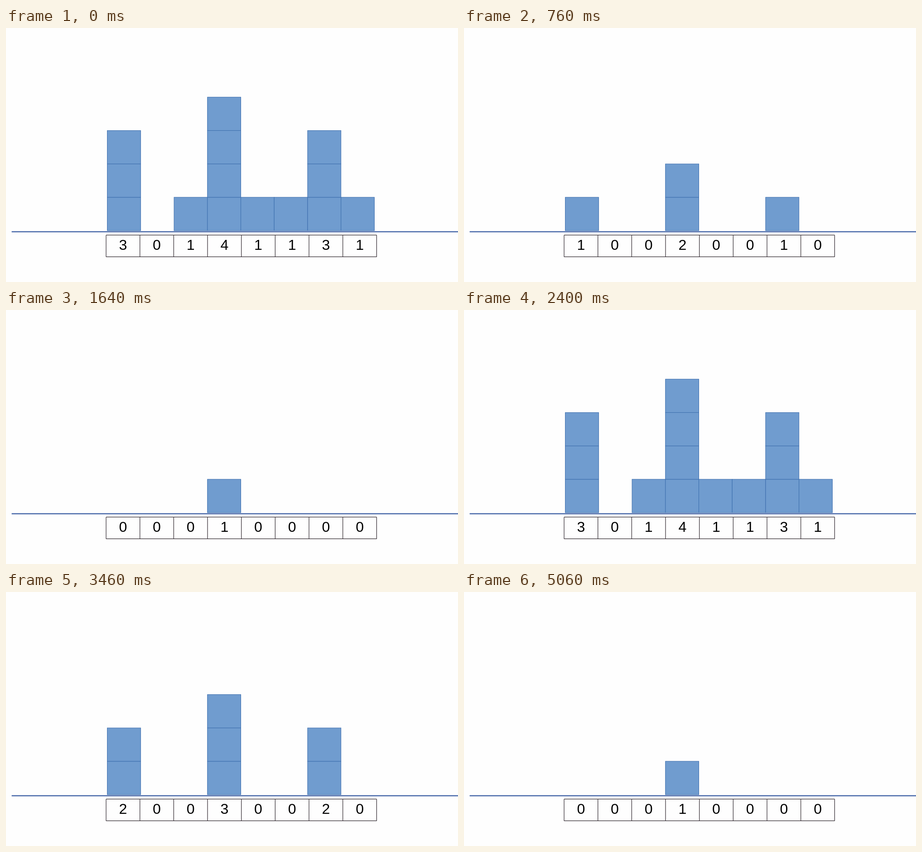
An HTML page that plays this animation: 998x561 px, repeating every 6160 ms.

```html
<!DOCTYPE html>
<html lang="en">
<head>
<meta charset="utf-8">
<title>Block columns</title>
<style>
  html, body { margin: 0; width: 100%; height: 100%; overflow: hidden; background: #fefefe; }
  svg { display: block; width: 998px; height: 561px; }
  text { font: 32px "Liberation Sans", Arial, sans-serif; text-anchor: middle; fill: #000; }
  .block { fill: #709ccf; stroke: #3d6eae; stroke-width: 1; }
  .ground { stroke: #4868a9; stroke-width: 2.6; }
  .grid { fill: none; stroke: #30282f; stroke-width: 1.2; }

  /* Each state cuts in and out hard, twice per loop. */
  .state { visibility: hidden; animation: 6160ms step-end infinite; }
  .s0 { animation-name: full; }
  .s1 { animation-name: minus1; }
  .s2 { animation-name: minus2; }
  .s3 { animation-name: minus3; }
  @keyframes full {
    0%, 38.961% { visibility: visible; }
    .649%, 52.922%, 100% { visibility: hidden; }
  }
  @keyframes minus1 {
    0%, 12.337%, 65.584%, 100% { visibility: hidden; }
    .649%, 52.922% { visibility: visible; }
  }
  @keyframes minus2 {
    0%, 24.35%, 82.142%, 100% { visibility: hidden; }
    12.337%, 65.584% { visibility: visible; }
  }
  @keyframes minus3 {
    0%, 38.961% { visibility: hidden; }
    24.35%, 82.142%, 100% { visibility: visible; }
  }
</style>
</head>
<body>
<svg id="stage" viewBox="0 0 998 561"></svg>
<script>
  const heights = [3, 0, 1, 4, 1, 1, 3, 1];
  const block = { x: 223.6, base: 447.6, size: 73.72 };
  const cell = { x: 221, top: 457.4, bottom: 505.4, width: 74.67 };
  const right = cell.x + cell.width * heights.length;

  const drawBlock = (col, row) =>
    `<rect class="block" x="${block.x + col * block.size}" y="${block.base - (row + 1) * block.size}"
      width="${block.size}" height="${block.size}"/>`;

  const drawColumn = (count, col) => {
    const blocks = Array.from({ length: count }, (_, row) => drawBlock(col, row)).join("");
    return `${blocks}<text x="${cell.x + (col + 0.5) * cell.width}" y="489.5">${count}</text>`;
  };

  // Every step takes one block off each column.
  const drawState = step => {
    const columns = heights.map((h, col) => drawColumn(Math.max(0, h - step), col));
    return `<g class="state s${step}">${columns.join("")}</g>`;
  };

  let grid = `M${cell.x} ${cell.top}H${right}M${cell.x} ${cell.bottom}H${right}`;
  for (let i = 0; i <= heights.length; i++) {
    grid += `M${cell.x + i * cell.width} ${cell.top}V${cell.bottom}`;
  }

  document.getElementById("stage").innerHTML =
    [0, 1, 2, 3].map(drawState).join("") +
    `<path class="ground" d="M12.5 450H998"/><path class="grid" d="${grid}"/>`;
</script>
</body>
</html>
```
